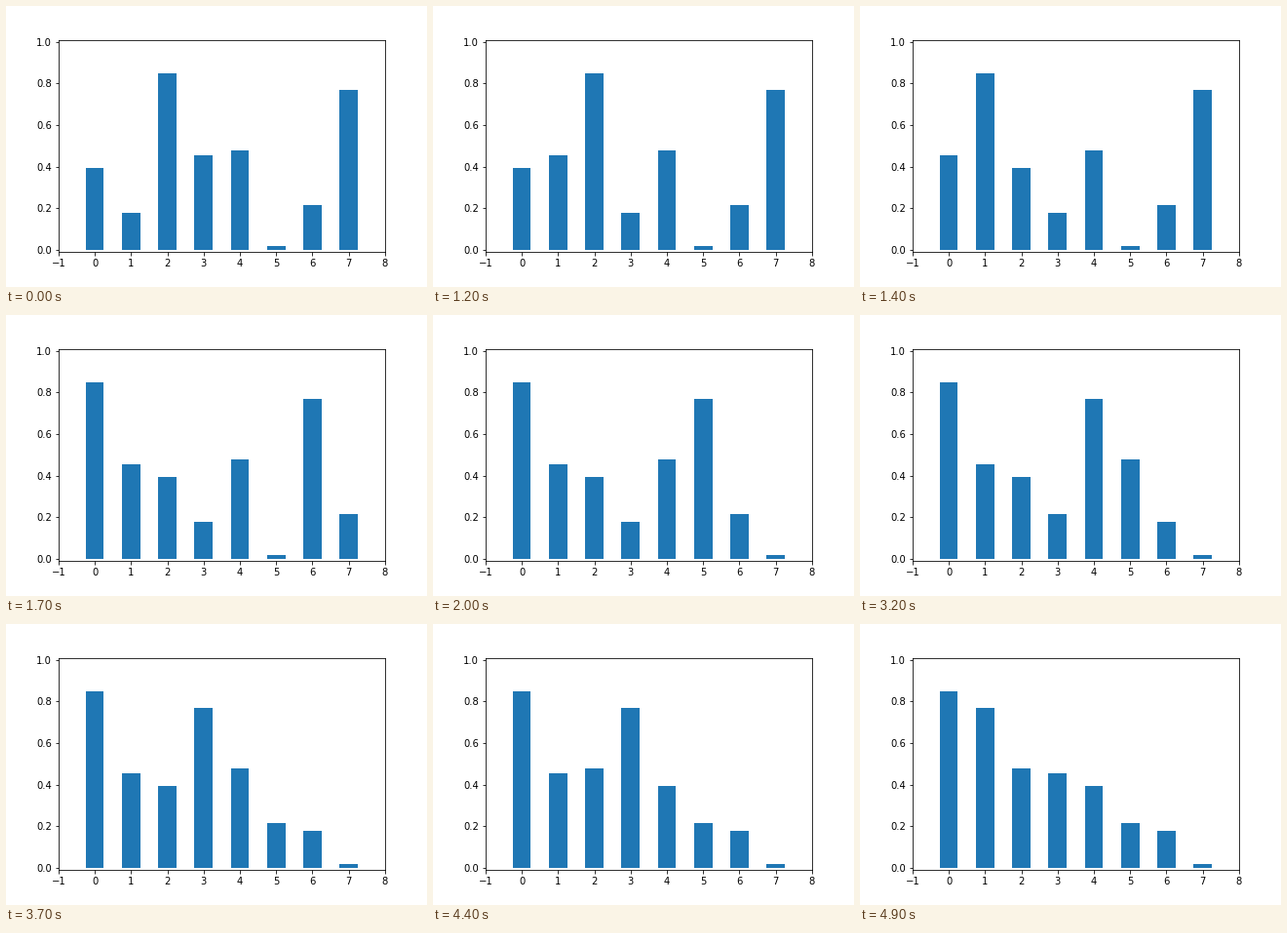
Write a matplotlib script that moves like this. It is 432 by 288 pixels and loops after 6.1 s.

```python
import numpy as np
import matplotlib.pyplot as plt
from matplotlib.animation import FuncAnimation

VALUES = [0.393, 0.178, 0.848, 0.4545, 0.478, 0.018, 0.215, 0.7685]
HOLD = 10  # still frames before and after sorting
STEP_MS = 100


def slowsort(a, lo, hi):
    """Sort a[lo..hi] in descending order, yielding after each comparison."""
    if lo >= hi:
        return
    mid = (lo + hi) // 2
    yield from slowsort(a, lo, mid)
    yield from slowsort(a, mid + 1, hi)
    if a[hi] > a[mid]:
        a[mid], a[hi] = a[hi], a[mid]
    yield list(a)
    yield from slowsort(a, lo, hi - 1)


steps = list(slowsort(list(VALUES), 0, len(VALUES) - 1))
states = [VALUES] * HOLD + steps + [steps[-1]] * HOLD

fig, ax = plt.subplots(figsize=(6, 4), dpi=72, facecolor="white")
fig.subplots_adjust(left=0.125, right=0.9, bottom=0.125, top=0.88)
bars = ax.bar(range(len(VALUES)), VALUES, width=0.5, color="#1f77b4")
ax.set_xlim(-1, 8)
ax.set_ylim(-0.01, 1.01)
ax.set_xticks(range(-1, 9))
ax.set_yticks(np.linspace(0, 1, 6))


def draw(i):
    for bar, height in zip(bars, states[i]):
        bar.set_height(height)
    return bars.patches


def reset():
    return draw(0)


anim = FuncAnimation(fig, draw, frames=len(states), init_func=reset,
                     interval=STEP_MS, repeat=True, repeat_delay=0, blit=False)
plt.show()
```
